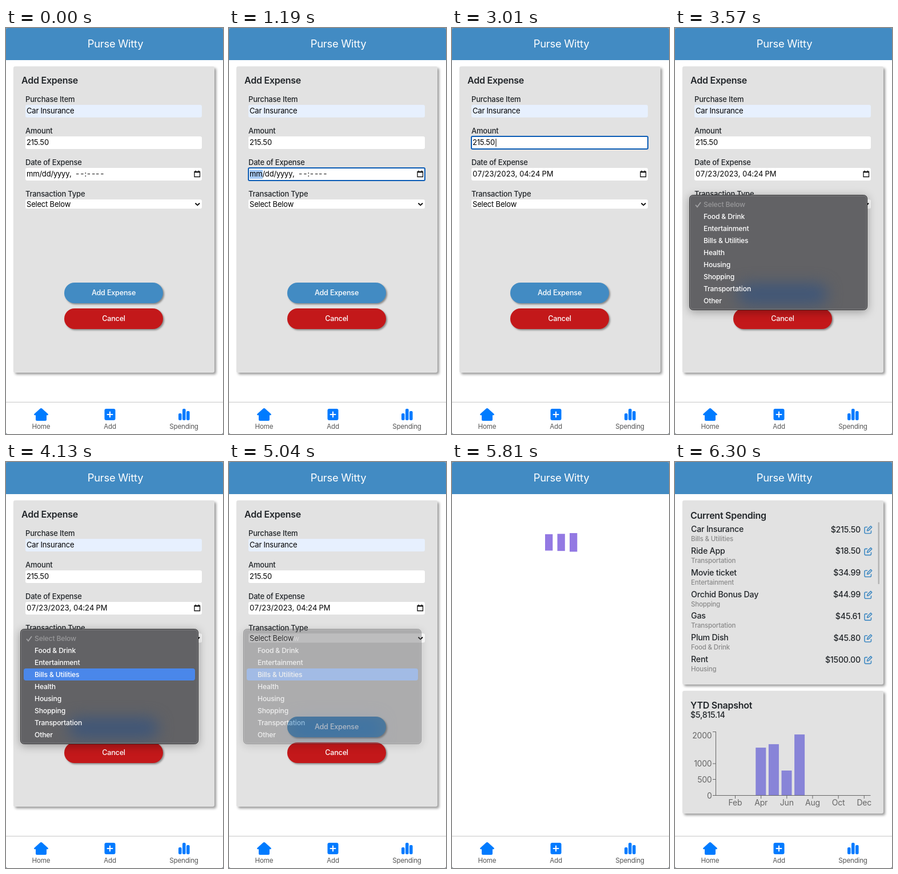
An HTML page that plays this animation: 380 px wide and 708 px high, repeating every 6.93 s.

```html
<!DOCTYPE html>
<html lang="en">
<head>
<meta charset="utf-8">
<title>Expense tracker</title>
<style>
  html, body { margin: 0; width: 100%; height: 100%; overflow: hidden; background: #6d7f8c; }
  svg { display: block; width: 380px; height: 708px; border-radius: 3px; background: #fff; }
  text { font-family: Inter, Roboto, sans-serif; letter-spacing: -.015em; fill: #000; white-space: pre; }
  .title { font-size: 16px; font-weight: 600; fill: #212529; }
  .label { font-size: 13px; font-weight: 500; fill: #212529; }
  .field { font-size: 13px; }
  .date { font-size: 13px; font-variant-numeric: tabular-nums; }
  .button { font-size: 12.6px; font-weight: 500; fill: #fff; text-anchor: middle; }
  .nav { font-size: 11.6px; fill: #555; text-anchor: middle; }
  .option { font-size: 12.2px; font-weight: 500; fill: #fff; }
  .item { font-size: 14.2px; font-weight: 500; fill: #212529; }
  .kind { font-size: 11.5px; font-weight: 500; fill: #8a8a8a; }
  .axis { font-size: 14px; fill: #666; }
  .end { text-anchor: end; }
  .mid { text-anchor: middle; }
  #picker text { font-family: "Liberation Sans", Arial, sans-serif; font-size: 11px; letter-spacing: 0; }
  #picker .time { font-size: 12.5px; text-anchor: middle; }
  #picker .bold { font-weight: 700; }
  #picker .white { fill: #fff; }
  #picker .dim { fill: #757575; }
  #picker .link { fill: #0066cc; }
  .card { filter: drop-shadow(3px 3px 2px #0006); }
  .pill { filter: drop-shadow(2px 2px 1.5px #0006); }
</style>
</head>
<body>
<svg id="stage" viewBox="0 0 380 708"></svg>
<script>
const LOOP = 6930;
const BLUE = '#428bc3', ICON = '#007bff';

const text = (x, y, str, cls, extra = '') =>
  `<text x="${x}" y="${y}" class="${cls}" ${extra}>${str.replace(/&/g, '&amp;')}</text>`;
const rect = (x, y, w, h, fill, r = 0, extra = '') =>
  `<rect x="${x}" y="${y}" width="${w}" height="${h}" rx="${r}" fill="${fill}" ${extra}/>`;
const line = (d, color, width = 1, extra = '') =>
  `<path d="${d}" fill="none" stroke="${color}" stroke-width="${width}" ${extra}/>`;
const group = (id, body, extra = '') => `<g id="${id}" ${extra}>${body}</g>`;
const card = (y, h) => rect(13, y, 352, h, '#e2e2e2', 3, 'class="card"');
const ring = (id, y, h) =>
  rect(34, y, 309, h, 'none', 2, `id="${id}" stroke="#0b5cb5" stroke-width="2"`);
const list = (n, fn) => Array.from({ length: n }, (_, i) => fn(i)).join('');

function chrome() {
  const tabs = [[61.5, 'Home'], [182, 'Add'], [311.5, 'Spending']];
  return rect(0, 0, 380, 56, BLUE) +
    text(191.5, 34, 'Purse Witty', 'mid', 'style="font-size:18.4px;fill:#fff"') +
    line('M0 652.5H380', '#c8c8c8') +
    `<path fill="${ICON}" d="M60 663.6q1.5-1.2 3 0L73.500 673q1.200 2-.8 2.200H71V683q0 2-2 2H54q-2 0-2-2V675.200H50.300q-2-.2-.8-2.200Z"/>` +
    rect(172.500, 664, 19, 20, ICON, 3) + line('M177.500 674h9M182 669.500v9', '#fff', 2, 'stroke-linecap="round"') +
    rect(302, 672, 5.600, 12, ICON, 2) + rect(309, 664, 5.600, 20, ICON, 2) + rect(316, 668, 5.600, 16, ICON, 2) +
    tabs.map(([x, name]) => text(x, 699, name, 'nav')).join('');
}

function form() {
  const labels = ['Purchase Item', 'Amount', 'Date of Expense', 'Transaction Type'];
  return card(67, 534) + text(27, 97, 'Add Expense', 'title') +
    labels.map((name, i) => text(34, 129 + 55 * i, name, 'label') +
      rect(34, 134 + 55 * i, 309, i < 3 ? 22 : 16, i ? '#fff' : '#e7f0fe', 3)).join('') +
    text(36, 149, 'Car Insurance', 'field') + text(36, 204, '215.50', 'field') +
    rect(36, 247, 23, 16, '#a9cdf6', 0, 'id="segment"') +
    group('blankDate', text(36, 259, 'mm/dd/yyyy,', 'date') + text(121, 259, '--:--', 'date') + text(156, 259, '--', 'date')) +
    group('filledDate', text(36, 259, '07/23/2023,', 'date') + text(118, 259, '04:24 PM', 'date')) +
    line('M330 250.500h9.500v9h-9.500zM330 251.500h9.500M332 248.500v2M337.500 248.500v2', '#111', 1.3) +
    text(36, 312, 'Select Below', 'field', 'id="choice"') +
    line('M331.500 305.500l3.800 3.600 3.800-3.600', '#000', 1.8) +
    ring('amountRing', 189, 22) + rect(76.500, 193, 1, 14, '#000', 0, 'id="caret"') +
    ring('dateRing', 244, 22) + ring('choiceRing', 299, 16) +
    rect(102, 444, 173, 36, BLUE, 18, 'class="pill"') + text(188.500, 466, 'Add Expense', 'button') +
    rect(102, 489, 173, 36, '#c3181a', 18, 'class="pill"') + text(188.500, 511, 'Cancel', 'button');
}

function picker() {
  const colX = i => 56.500 + 25.150 * i;
  const days = list(42, i => {
    const day = i - 5, month = day < 1 ? -1 : day > 31 ? 1 : 0;
    const value = month < 0 ? day + 30 : month ? day - 31 : day;
    const cls = day === 23 ? 'mid bold white' : month ? 'mid dim' : 'mid';
    return text(colX(i % 7), 350 + 25.200 * Math.floor(i / 7), `${value}`, cls);
  });
  const column = (x, values) => rect(x - 23.500, 279, 47, 32, '#0075ff', 2) +
    values.map((v, i) => text(x, 299.300 + 30.900 * i, v, i ? 'time' : 'time bold white')).join('');
  const count = from => Array.from({ length: 8 }, (_, i) => `${from + i}`.padStart(2, '0'));
  return rect(33.500, 265.500, 360, 255, '#fff', 0, 'stroke="#222" style="filter:drop-shadow(0 4px 7px #0006)"') +
    text(44, 291, 'July 2023', 'bold') + '<path d="M96 286h6l-3 3.500z"/>' +
    line('M179 295v-13.500m-6 6l6-6 6 6M208 281v13.500m-6-6l6 6 6-6', '#222') +
    [...'SMTWTFS'].map((d, i) => text(colX(i), 323, d, 'mid')).join('') +
    rect(44, 434, 25, 25, '#0075ff', 1) + days +
    text(54, 504, 'Clear', 'link') + text(181.500, 504, 'Today', 'link') +
    '<clipPath id="times"><path d="M230 270h150v237H230z"/></clipPath>' +
    group('columns', column(257.500, count(4)) + column(307.700, count(24)) + column(358.500, ['PM', 'AM']), 'clip-path="url(#times)"');
}

function menu() {
  const options = ['Select Below', 'Food & Drink', 'Entertainment', 'Bills & Utilities', 'Health',
    'Housing', 'Shopping', 'Transportation', 'Other'];
  return rect(25.500, 291.500, 311, 200, '#626265', 6, 'stroke="#29292b" style="filter:drop-shadow(0 3px 8px #0005)"') +
    '<clipPath id="panel"><rect x="26" y="292" width="310" height="199" rx="5"/></clipPath>' +
    group('tint', rect(110, 446, 157, 36, '#3f5678', 18, 'style="filter:blur(13px)"'), 'clip-path="url(#panel)"') +
    rect(26.500, 292.500, 309, 198, 'none', 5, 'stroke="#858588"') +
    rect(31, 360, 300, 21, '#4a87ea', 4, 'id="hover"') +
    line('M36 308.500l3 3.500 6-8', '#a2a2a4', 1.800) +
    options.map((name, i) => text(50, 312 + 21 * i, name, 'option', i ? '' : 'style="fill:#98989a"')).join('');
}

function spending() {
  const items = [
    ['Car Insurance', 'Bills & Utilities', '215.50'], ['Ride App', 'Transportation', '18.50'],
    ['Movie ticket', 'Entertainment', '34.99'], ['Orchid Bonus Day', 'Shopping', '44.99'],
    ['Gas', 'Transportation', '45.61'], ['Plum Dish', 'Food & Drink', '45.80'], ['Rent', 'Housing', '1500.00']];
  const edit = 'M337 113.500h-3q-2 0-2 2v7q0 2 2 2h7.500q2 0 2-2v-3M336.500 120l.6-2.600 5.600-5.600 2 2-5.600 5.600z';
  const row = ([name, kind, cost], i) => `<g transform="translate(0 ${37.850 * i})">` +
    text(28, 122, name, 'item') + text(28, 138, kind, 'kind') + text(325, 122.500, '$' + cost, 'item end') +
    line(edit, BLUE, 1.600, 'stroke-linejoin="round"') + '</g>';
  const yTicks = [[470.500, '2000', 482], [526, '1000', 531], [553.500, '500', 558.500], [581.500, '0', 586.500]];
  const months = ['Feb', 'Apr', 'Jun', 'Aug', 'Oct', 'Dec'];
  return card(67, 321) + text(27, 99, 'Current Spending', 'title') + items.map(row).join('') +
    rect(355.500, 105, 2.500, 108, '#b4b4b4', 1) +
    card(399, 214) + text(27, 430, 'YTD Snapshot', 'title') + text(27, 446, '$5,815.14', 'item') +
    list(4, i => rect(141.300 + 22.600 * i, 581, 18, 0, '#8884d8', 0, 'class="bar"')) +
    line('M71.500 470V581.500H342.500', '#666') +
    yTicks.map(([y, name, base]) => line(`M66 ${y}h6`, '#666') + text(64.500, base, name, 'axis end')).join('') +
    months.map((m, i) => line(`M${105.500 + 45.150 * i} 581v6`, '#666') +
      text(105.500 + 45.150 * i, 599, m, 'axis mid')).join('');
}

const stage = document.getElementById('stage');
stage.innerHTML = chrome() +
  group('form', form() + group('picker', picker()) + group('menu', menu())) +
  group('loader', list(3, i => rect(163 + 21.500 * i, 0, 13.300, 0, '#9379e3'))) +
  group('spending', spending());

const el = id => document.getElementById(id);
const show = (id, on) => { el(id).style.display = on ? '' : 'none'; };
const clamp = v => Math.min(1, Math.max(0, v));

// CSS-style cubic-bezier easing, solved by bisection
function bezier(x1, y1, x2, y2, x) {
  const at = (a, b, u) => 3 * a * u * (1 - u) ** 2 + 3 * b * u * u * (1 - u) + u ** 3;
  let lo = 0, hi = 1;
  for (let i = 0; i < 20; i++) {
    const u = (lo + hi) / 2;
    if (at(x1, x2, u) < x) lo = u; else hi = u;
  }
  return at(y1, y2, hi);
}

const loaderBars = [...el('loader').children];
const chartBars = [...document.querySelectorAll('.bar')];
const chartHeights = [83, 89, 43, 106];

function render(t) {
  const within = (from, to) => t >= from && t < to;
  const filled = t >= 2730, chosen = t >= 5390;

  show('form', t < 5530);
  show('loader', within(5530, 5880));
  show('spending', t >= 5880);

  show('dateRing', within(1120, 3010));
  show('segment', within(1120, 3010));
  el('segment').setAttribute('width', filled ? 17 : 23);
  show('blankDate', !filled);
  show('filledDate', filled);
  show('picker', within(2030, 3010));
  show('amountRing', within(3010, 3500));
  show('caret', within(3010, 3500));

  show('menu', within(3500, 5250));
  el('menu').style.opacity = (1 - clamp((t - 4830) / 420)) ** 1.25;
  show('hover', t >= 3780 && !within(4830, 4900));
  el('hover').setAttribute('y', t < 3990 ? 339 : 360);
  el('choice').textContent = chosen ? 'Bills & Utilities' : 'Select Below';
  show('choiceRing', chosen);

  loaderBars.forEach((bar, i) => {
    const phase = (t - 5530 + 36 + (2 - i) * 120) / 600;
    const h = 56.500 - 28 * bezier(0, .5, .5, 1, clamp(phase % 2));
    bar.setAttribute('y', 140.200 - h / 2);
    bar.setAttribute('height', Math.max(0, h));
  });

  const grow = bezier(.25, .1, .25, 1, clamp((t - 5920) / 400));
  chartBars.forEach((bar, i) => {
    bar.setAttribute('y', 581 - chartHeights[i] * grow);
    bar.setAttribute('height', chartHeights[i] * grow);
  });
}

function tick() {
  render(performance.now() % LOOP);
  requestAnimationFrame(tick);
}
tick();
</script>
</body>
</html>
```
